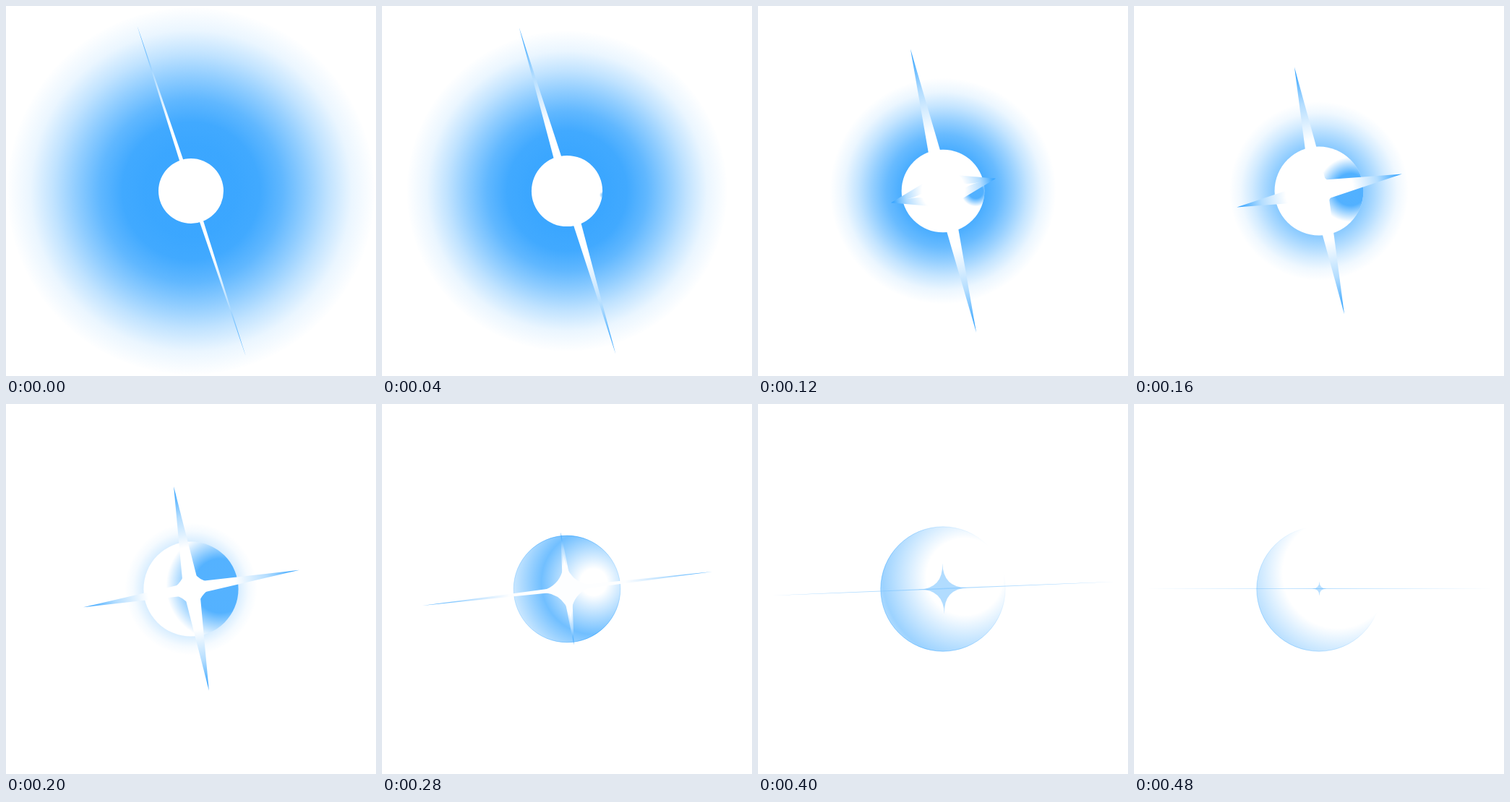
These frames come from a looping animation (512 by 512 pixels, 0.52 s). An HTML page with a canvas:

```html
<!DOCTYPE html>
<html lang="en">
<head>
<meta charset="utf-8">
<title>Blue star burst</title>
<style>
  html, body { margin: 0; width: 100%; height: 100%; overflow: hidden; background: #fff; }
  canvas { display: block; width: 512px; height: 512px; }
</style>
</head>
<body>
<canvas id="stage" width="512" height="512"></canvas>
<script>
const ctx = document.getElementById('stage').getContext('2d');
const STEP = 40, STEPS = 13;
const MID = 256;
const BLUE = [38, 157, 255];

const clamp = x => Math.max(0, Math.min(1, x));
const ramp = (from, to, t) => clamp((t - from) / (to - from));
const smooth = (from, to, t) => {
  const u = ramp(from, to, t);
  return u * u * (3 - 2 * u);
};

const blue = alpha => `rgba(${BLUE.join()},${alpha})`;
const tint = (white, alpha) =>
  `rgba(${BLUE.map(c => Math.round(c + (255 - c) * white)).join()},${alpha})`;

function radial(x, y, radius, stops) {
  const gradient = ctx.createRadialGradient(x, y, 0, x, y, radius);
  for (const [at, color] of stops) gradient.addColorStop(clamp(at), color);
  return gradient;
}

function disc(radius, fill) {
  ctx.beginPath();
  ctx.arc(MID, MID, radius, 0, Math.PI * 2);
  ctx.fillStyle = fill;
  ctx.fill();
}

// A shrinking halo with a long soft tail.
function drawGlow(t) {
  const radius = Math.max(1, 254 - 390 * t);
  const peak = 0.9 * clamp(1.6 - 2.6 * t);
  const stops = [];
  for (let at = 0; at <= 1; at += 0.125) {
    stops.push([at, blue(peak * (1 - smooth(0.3, 1.02, at)))]);
  }
  disc(radius, radial(MID, MID, radius, stops));
}

// A white ball; a blue spot opens in it and hollows out into a crescent.
function drawBall(t) {
  const radius = 45 + 41.2 * clamp(1.2 * t);
  disc(radius, '#fff');

  const outer = 60 * t + 110 * smooth(0.18, 0.68, t);
  if (outer < 1) return;
  const middle = 120 * smooth(0.1, 0.95, t);
  const inner = 76 * ramp(0.45, 1, t);
  const core = blue(0.8 * clamp(6 * (0.58 - t)));
  const shade = radial(308 - 26 * t, 264 - 30 * t, outer, [
    [0, core],
    [inner / outer, core],
    [middle / outer, blue(0.8 - 0.8 * Math.max(0, t - 0.4))],
    [1, blue(0)]
  ]);
  disc(radius, shade);
  if (inner > 0) {
    ctx.strokeStyle = shade;
    ctx.lineWidth = 1;
    ctx.stroke();
  }
}

function spike(angle, length, width) {
  if (length < 1 || width <= 0) return;
  ctx.save();
  ctx.rotate(angle);
  ctx.beginPath();
  ctx.moveTo(0, -width);
  ctx.lineTo(length, 0);
  ctx.lineTo(0, width);
  ctx.fill();
  ctx.restore();
}

// The four-pointed core rounds the corners between the spikes.
function sparkle(size) {
  ctx.beginPath();
  ctx.moveTo(size, 0);
  for (let i = 1; i <= 4; i++) {
    const a = i * Math.PI / 2;
    ctx.quadraticCurveTo(0, 0, size * Math.cos(a), size * Math.sin(a));
  }
  ctx.fill();
}

function drawStar(t) {
  const white = clamp((1 - t) / 0.42);
  const alpha = 0.33 + 0.67 * white;
  const tall = 120 * (1 + Math.cos(Math.PI * 1.05 * t));
  const tallWidth = t < 0.72 ? 12 * Math.sin(Math.PI * (t + 0.07) / 0.8) : 0;
  const wide = 240 * (1 - Math.pow(1 - ramp(0.13, 1, t), 2.5));
  const wideWidth = Math.max(0.6, 24 * Math.exp(-6 * (t - 0.25)));
  const paint = length => radial(0, 0, Math.max(1, length), [
    [0, tint(white, alpha)],
    [0.4, tint(white, alpha)],
    [0.7, tint(white * 0.65, alpha)],
    [1, tint(0, alpha)]
  ]);

  ctx.save();
  ctx.translate(256.5, 255.5);
  ctx.rotate(-18.2 * Math.pow(1 - t, 1.15) * Math.PI / 180);
  for (const side of [0, Math.PI]) {
    ctx.fillStyle = paint(wide);
    spike(side, wide, wideWidth);
    ctx.fillStyle = paint(tall);
    spike(side + Math.PI / 2, tall, tallWidth);
  }
  ctx.fillStyle = tint(white, alpha);
  if (t > 0.2) sparkle(10 + 42 * (1 - Math.pow(t, 5)));
  ctx.restore();
}

function draw() {
  const t = Math.floor(performance.now() / STEP) % STEPS / (STEPS - 1);
  ctx.fillStyle = '#fff';
  ctx.fillRect(0, 0, 512, 512);
  drawGlow(t);
  drawBall(t);
  drawStar(t);
  requestAnimationFrame(draw);
}
draw();
</script>
</body>
</html>
```
